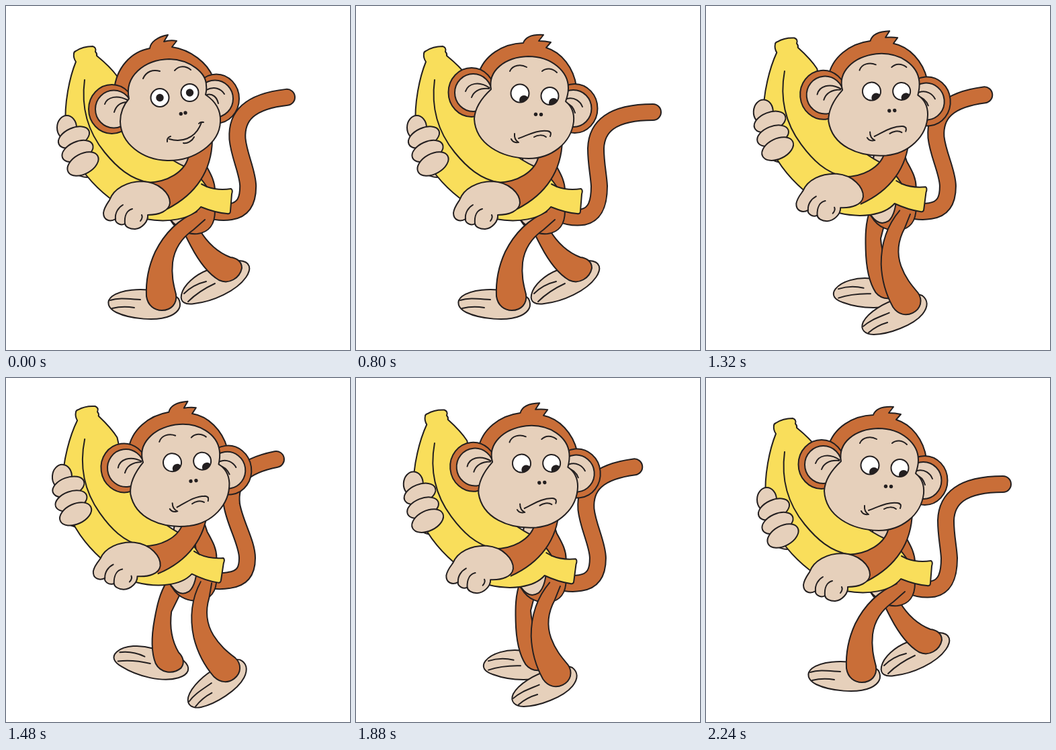
An HTML page with a canvas that plays this animation: 512 by 512 pixels, repeating every 2.32 s.

```html
<!DOCTYPE html>
<html lang="en">
<head>
<meta charset="utf-8">
<title>Monkey with a banana</title>
<style>
html, body { margin: 0; width: 100%; height: 100%; overflow: hidden; background: #fff; }
canvas { display: block; width: 100%; height: 100%; }
</style>
</head>
<body>
<canvas id="stage" width="512" height="512"></canvas>
<script>
const ctx = document.getElementById('stage').getContext('2d');
const LOOP = 2320, STEP = 40;
const INK = '#231f20', FUR = '#c96e38', SKIN = '#e6d0bb', PEEL = '#f9de5b';

const lerp = (a, b, k) => a + (b - a) * k;
const progress = (t, from, to) => Math.min(1, Math.max(0, (t - from) / (to - from)));

// Blends two path strings of the same structure.
function mix(a, b, k) {
  const target = b.match(/[\d.]+/g);
  let i = 0;
  return a.replace(/[\d.]+/g, n => lerp(+n, +target[i++], k).toFixed(2));
}

function shape(d, fill) {
  const p = new Path2D(d);
  if (fill) { ctx.fillStyle = fill; ctx.fill(p); }
  ctx.stroke(p);
}

function oval(x, y, rx, ry, fill, angle = 0) {
  ctx.beginPath();
  ctx.ellipse(x, y, rx, ry, angle, 0, Math.PI * 2);
  ctx.fillStyle = fill;
  ctx.fill();
  ctx.stroke();
}

function dot(x, y, r) {
  ctx.beginPath();
  ctx.arc(x, y, r, 0, Math.PI * 2);
  ctx.fillStyle = INK;
  ctx.fill();
}

function moved(dx, dy, draw) {
  ctx.save();
  ctx.translate(dx, dy);
  draw();
  ctx.restore();
}

function turned(angle, x, y, draw, sx = 1, sy = 1) {
  ctx.save();
  ctx.translate(x, y);
  ctx.rotate(angle);
  ctx.scale(sx, sy);
  ctx.translate(-x, -y);
  draw();
  ctx.restore();
}

const TAIL_LOW = 'M300 308 C312 313 325 316 338 314 C357 310 362 292 362 268 C361 250 357 235 357 212 C358 180 380 158 442 158';
const TAIL_HIGH = 'M300 300 C312 303 320 303 332 301 C354 298 359 285 359 268 C359 245 340 215 336 188 C332 152 352 131 402 121';

function tail(k) {
  const p = new Path2D(mix(TAIL_LOW, TAIL_HIGH, k));
  ctx.save();
  for (const [width, color] of [[26, INK], [22, FUR]]) {
    ctx.lineWidth = width;
    ctx.strokeStyle = color;
    ctx.stroke(p);
  }
  ctx.restore();
}

function backLeg() {
  shape('M300 393 C282 400 264 415 261 430 C259 441 267 445 280 443 C308 440 343 424 357 404 C366 391 364 380 347 379', SKIN);
  shape('M265 428 C274 419 285 413 298 410 M271 440 C284 427 298 419 311 413');
  shape('M255 302 C257 322 266 340 275 357 C286 378 300 398 317 408 C332 415 348 405 351 390 C351 380 343 375 334 374 C316 367 300 353 288 333 L281 300', FUR);
}

function frontLeg() {
  shape('M222 424 C200 420 172 422 158 432 C148 440 152 450 164 456 C185 466 225 470 245 461 C258 455 262 446 257 436 C250 428 240 425 222 424', SKIN);
  shape('M155 438 C168 434 182 436 200 437 M158 450 C170 447 180 447 191 449');
  shape('M284 306 C258 317 236 338 222 366 C211 390 208 412 209 432 C211 446 221 453 232 453 C246 453 255 443 253 429 C249 414 246 400 248 382 C251 358 266 342 279 333 L296 318', FUR);
}

function torso() {
  shape('M249 222 C246 250 228 300 245 319 C255 336 272 340 285 339 C302 337 311 325 311 305 L311 275 C311 260 304 249 297 236 L290 215 Z', FUR);
  shape('M249 222 C246 250 228 300 245 318 C253 329 262 330 270 325 C278 318 282 305 282 280 L275 215 Z', SKIN);
}

function farHand() {
  oval(90.5, 181, 14.5, 18, SKIN);
  oval(101, 195.5, 24.5, 14, SKIN, -0.42);
  oval(106.5, 216, 24.5, 14, SKIN, -0.42);
  oval(114.5, 235, 25, 15, SKIN, -0.5);
}

function banana() {
  shape('M104 67 C110 63 120 60 129 60 Q135 62 133 68 Q136 71 135 74 C146 83 157 93 165 104 C180 158 202 210 268 240 C280 246 292 258 299 269 C310 273 322 274 335 272 Q338 274 336 280 L334 305 Q334 310 329 309 C315 308 300 303 290 299 C275 318 240 323 208 317 C147 291 95 241 89 180 C86 145 95 105 104 83 Q100 77 101 71 Q101 68 104 67 Z', PEEL);
  shape('M117 110 C111 155 124 190 147 218 C165 240 185 258 214 263 M299 269 L291 265');
}

function nearArm() {
  ctx.fillStyle = FUR;
  ctx.fill(new Path2D('M272 222 C268 246 240 264 205 263 L240 302 C283 280 306 245 307 200 Z'));
  shape('M272 222 C268 246 240 264 205 263 M240 302 C283 280 306 245 307 200');
}

function nearHand() {
  shape('M154 289 C160 272 180 261 203 261 C228 262 244 279 244 293 C243 305 228 311 211 311 C212 320 203 331 192 332 C184 332 178 329 177 324 C170 328 162 322 163 317 C155 322 145 319 145 308 C146 300 150 295 154 289 Z', SKIN);
  shape('M163 317 C162 308 167 300 174 296 M177 324 C176 312 180 304 188 302 M202 311 Q204 315 200 320');
}

// Each part holds the pose facing out and the pose looking back.
const HEAD = {
  hair: [
    'M161 125 C164 92 186 68 214 63 C215 54 225 46 241 43 L235 53 Q245 50 254 52 L247 61 C275 65 300 85 308 106 L300 150 L180 170 Z',
    'M182 102 C190 74 218 56 249 55 C252 47 262 42 279 43 L272 52 Q282 52 290 54 L283 62 C306 69 324 92 328 120 L318 150 L200 160 Z'],
  earLines: [
    'M147 146 C151 135 166 132 181 140 M161 158 C164 148 170 143 181 143 M298 125 C310 119 320 123 325 131 M299 132 C308 130 314 136 316 145',
    'M163 127 C167 115 183 111 199 122 M172 136 C176 126 186 122 198 123 M314 138 C325 135 334 142 337 150 M312 144 C319 146 324 152 326 159'],
  face: [
    'M183 138 C176 105 205 80 243 79 C275 80 298 100 298 118 C299 124 298 128 297 132 C312 142 320 155 319 172 C318 205 280 231 240 230 C203 229 171 205 170 172 C170 158 176 146 183 138 Z',
    'M201 124 C196 96 222 76 256 75 C292 75 316 98 316 122 C316 130 315 134 312 142 C322 150 325 160 324 172 C320 205 290 227 257 227 C215 226 178 205 176 168 C177 150 188 136 201 124 Z'],
  brows: [
    'M204 108 C209 97 219 94 229 97 M251 96 C258 88 268 89 275 95',
    'M229 97 C233 88 245 86 254 91 M277 97 C283 92 292 92 299 99'],
  mouth: [
    'M243 198 C262 204 280 196 288 180 C289 178 290 176 291 173 M240 202 Q239 196 245 194 M240 202 Q239 196 245 194 M287 175 Q289 172 294 173 M264 204 C270 205 277 201 280 195',
    'M242 197 C256 192 270 184 285 186 C290 187 291 190 289 194 M236 190 Q235 199 242 203 M231 198 Q234 204 241 203 M285 186 Q288 186 290 189 M265 195 C270 192 278 191 283 195']
};

function eye(x, y, r, px, py, pr) {
  oval(x, y, r, r, '#fff');
  ctx.save();
  ctx.beginPath();
  ctx.arc(x, y, r, 0, Math.PI * 2);
  ctx.clip();
  dot(px, py, pr);
  ctx.restore();
}

function head(turn, shock) {
  const at = (a, b) => lerp(a, b, turn);
  const part = name => mix(...HEAD[name], turn);
  const left = shock * (1 - turn);
  const size = 1 - 0.7 * left, dx = 3.5 * left, dy = 9.8 * left;

  shape(part('hair'), FUR);
  oval(at(157.5, 172), at(153.5, 128.5), 34.5, 36.5, FUR);
  oval(at(313, 325.5), at(138, 152.5), 34, 36.5, FUR);
  oval(at(160.5, 174.5), at(153.5, 129), 27.5, 28, SKIN);
  oval(at(311, 323.5), at(138, 152.5), 27, 27.5, SKIN);
  shape(part('earLines'));
  shape(part('face'), SKIN);
  moved(dx, dy, () => {
    shape(part('brows'));
    eye(at(229, 244), at(136.5, 130), 13.5 * size, at(229, 250), at(136.5, 140), at(5.7, 7) * size);
    eye(at(273.5, 288.5), at(129, 134), 13 * size, at(273.5, 294), at(129, 144), at(5.7, 7) * size);
  });
  dot(at(260.3, 267.5), at(160.5, 161.3), 2.7);
  dot(at(267, 275.5), at(159, 161.5), 2.7);
  shape(part('mouth'));
}

function draw(t) {
  const shock = progress(t, 160, 440);
  const turn = progress(t, 560, 800);
  const cycle = progress(t, 960, 2240);
  const sway = 1 - Math.abs(1 - 2 * cycle);
  const swing = 0.82 * sway;

  ctx.fillStyle = '#fff';
  ctx.fillRect(0, 0, 512, 512);
  ctx.strokeStyle = INK;
  ctx.lineWidth = 2;
  ctx.lineCap = ctx.lineJoin = 'round';

  tail(0.6 * (1 - shock ** 1.6) + sway / 0.812);
  turned(swing, 245.6, 280, backLeg);
  moved(3 * sway, -9 * sway, torso);
  turned(-swing, 283, 296, frontLeg, 1 - 0.05 * sway, 1 - 0.023 * sway);
  turned(0.086 * sway, 388, 103, () => {
    const grip = draw => moved(-4 * sway, -16 * sway, draw);
    grip(() => shape('M100 248 Q112 255 121 255 L126 240 Z', SKIN));
    banana();
    grip(farHand);
    nearArm();
    moved(-2 * sway, -3.5 * sway, nearHand);
  });
  turned(-0.166 * sway, 214, 102, () => head(turn, shock));
}

const start = performance.now();
function frame() {
  const t = (performance.now() - start) % LOOP;
  draw(Math.floor(t / STEP) * STEP);
  requestAnimationFrame(frame);
}
frame();
</script>
</body>
</html>
```
